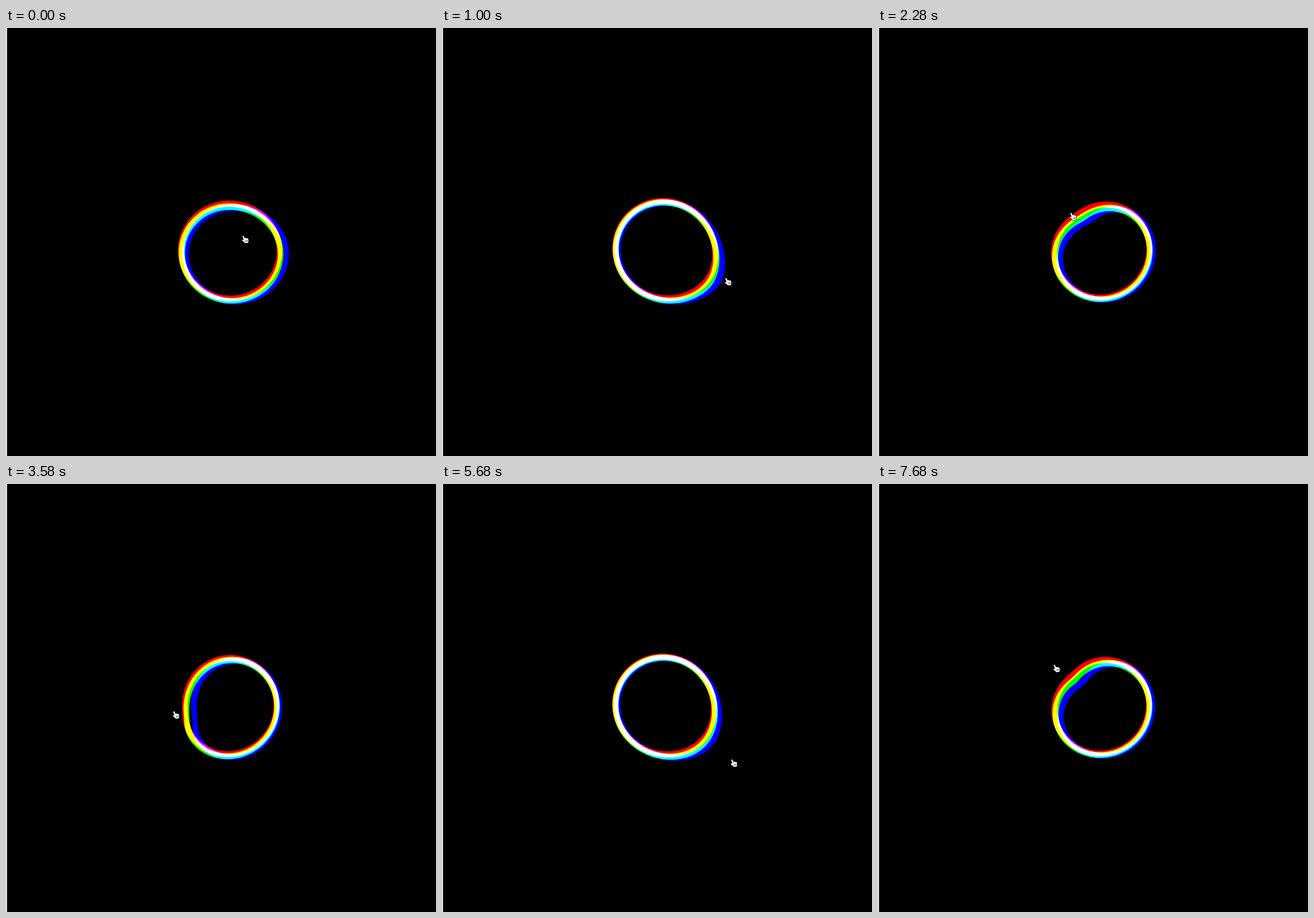
An HTML page that plays this animation: 751x746 px, repeating every 7.78 s.

```html
<!DOCTYPE html>
<html lang="en">
<head>
<meta charset="utf-8">
<title>Chromatic ring</title>
<style>
  html, body { margin: 0; width: 100%; height: 100%; overflow: hidden; background: #000; }
  svg { display: block; width: 100vw; height: 100vh; isolation: isolate; }
  .ring { mix-blend-mode: screen; fill-rule: evenodd; }
</style>
</head>
<body>
<svg viewBox="0 0 751 746">
  <rect width="751" height="746" fill="#000"/>
  <rect width="1.7" height="746" fill="#fff"/>
  <path class="ring" fill="#f00"/>
  <path class="ring" fill="#0f0"/>
  <path class="ring" fill="#00f"/>
  <g id="hand" stroke="#000" stroke-linejoin="round" stroke-linecap="round">
    <path fill="#fff" stroke-width="1.4" paint-order="stroke"
      d="M0 1.2Q.6-.4 2 .4L4 4.4Q5 3.6 6 4.5Q7.2 3.8 8.2 4.8Q9.6 4.4 10.1 5.8L10.5 10L9.6 12.6L4.4 13L3.2 11.4L-.4 8.6Q-.8 7.2 .6 7.1L2.4 7.6Z"/>
    <path fill="none" stroke-width=".6" d="M5.2 8L5.5 10.6M6.9 7.8L7.2 10.4M8.6 7.6L8.8 10.2"/>
  </g>
</svg>
<script>
const LOOP = 7780;
const CENTER = { x: 384, y: 381.4 };
const RADII = [[89.6, 88.8], [79.3, 78.4]];
const REACH = 140;     // distance over which the push fades
const LAG = 1.3;       // steps the rings trail behind the pointer
const SEGMENTS = 180;

// Largest shift of the red, green and blue ring, at the pointer itself
const SHIFTS = [[14, 14], [17, 22.5], [32, 25.5]];

// Key points of the pointer's path: step, x, y
const PATH = [
  [0, 413, 362], [27, 482, 416], [42, 501, 466], [68, 454, 337],
  [82, 336, 322], [95, 292, 396], [105, 345, 478], [113, 470, 481],
  [116, 505, 480], [124, 496, 385], [136, 307, 315]
];

const rings = document.querySelectorAll('.ring');
const hand = document.getElementById('hand');

// Steps last 20 ms at first, 100 ms later
const stepAt = t => t < 1480 ? Math.floor(t / 20) : 74 + Math.floor((t - 1480) / 100);

function slope(i, axis) {
  const a = PATH[Math.max(i - 1, 0)];
  const b = PATH[Math.min(i + 1, PATH.length - 1)];
  return (b[axis] - a[axis]) / (b[0] - a[0]);
}

function pointerAt(step) {
  let i = 0;
  while (i < PATH.length - 2 && PATH[i + 1][0] <= step) i++;
  const a = PATH[i], b = PATH[i + 1], span = b[0] - a[0];
  const u = (step - a[0]) / span, v = 1 - u;
  const hermite = axis =>
    a[axis] * v * v * (1 + 2 * u) + b[axis] * u * u * (3 - 2 * u) +
    span * u * v * (slope(i, axis) * v - slope(i + 1, axis) * u);
  return { x: hermite(1), y: hermite(2) };
}

function outline([rx, ry], [dx, dy], pointer) {
  const points = Array.from({ length: SEGMENTS }, (_, i) => {
    const angle = i / SEGMENTS * 2 * Math.PI;
    const x = CENTER.x + rx * Math.cos(angle);
    const y = CENTER.y + ry * Math.sin(angle);
    const push = Math.exp(-Math.hypot(x - pointer.x, y - pointer.y) / REACH);
    return `${(x + dx * push).toFixed(2)} ${(y + dy * push).toFixed(2)}`;
  });
  return `M${points.join('L')}Z`;
}

function render(t) {
  const step = stepAt(t);
  const pointer = pointerAt(step);
  const trailing = pointerAt(Math.max(0, step - LAG));
  rings.forEach((ring, i) =>
    ring.setAttribute('d', RADII.map(r => outline(r, SHIFTS[i], trailing)).join('')));
  hand.setAttribute('transform', `translate(${pointer.x.toFixed(1)} ${pointer.y.toFixed(1)})`);
}

const start = performance.now();
function tick() {
  render((performance.now() - start) % LOOP);
  requestAnimationFrame(tick);
}
tick();
</script>
</body>
</html>
```
